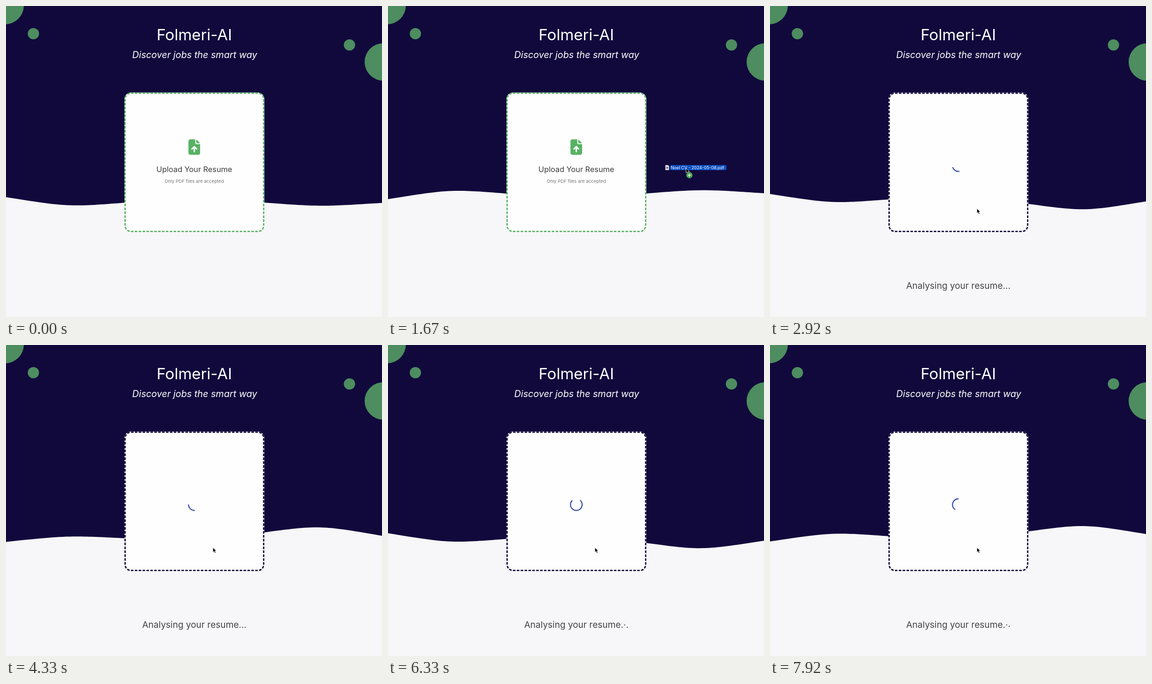
An HTML page for the animation above (8000 ms loop, 800x663 px).

```html
<!DOCTYPE html>
<html lang="en">
<head>
<meta charset="utf-8">
<title>Resume upload</title>
<style>
  html, body { margin: 0; width: 100%; height: 100%; overflow: hidden; background: #11093c; }
  svg { display: block; width: 100%; height: 100%; }
  text { font-family: Inter, "Open Sans", sans-serif; font-optical-sizing: none; }
  .mid { text-anchor: middle; }
  #title { font-size: 33px; fill: #fff; }
  #tagline { font-size: 19.8px; font-style: italic; fill: #fff; }
  #prompt { font-size: 16.3px; fill: #3d3d3d; }
  #hint { font-size: 9.6px; fill: #777; }
  #status { font-size: 19px; fill: #444; }
  #label { font-size: 9px; fill: #fff; }
  #border { fill: none; stroke-width: 2.8; stroke-dasharray: 2 1; }
  .bubbles { fill: #4d8d5f; }
  .loading { display: none; }
</style>
</head>
<body>
<svg viewBox="0 0 800 663" preserveAspectRatio="none">
  <defs>
    <path id="arrow" d="M0 0V10.2L2.4 8 4 11.8 6 11 4.4 7.3H7.4Z" fill="#000" stroke="#fff" stroke-width=".8"/>
  </defs>

  <rect width="800" height="663" fill="#11093c"/>
  <g class="bubbles">
    <circle cx="-2" cy="-1" r="40"/>
    <circle cx="58.3" cy="59" r="12"/>
    <circle cx="730.8" cy="83" r="12"/>
    <circle cx="803" cy="119.3" r="40"/>
  </g>
  <path id="wave" fill="#f7f6f8"/>

  <text id="title" class="mid" x="400.7" y="73">Folmeri-AI</text>
  <text id="tagline" class="mid" x="401.5" y="111.3">Discover jobs the smart way</text>

  <rect x="252" y="184.5" width="297.6" height="297.6" rx="14" fill="#fefefe"/>
  <rect id="border" x="253.4" y="185.9" width="294.8" height="294.8" rx="12.5" pathLength="420"/>

  <g class="idle">
    <g transform="translate(388.2 284.3) scale(.0645)" fill="#58b264">
      <path d="M224 0H64A64 64 0 0 0 0 64V448A64 64 0 0 0 64 512H320A64 64 0 0 0 384 448V160H256A32 32 0 0 1 224 128ZM256 0V128H384Z"/>
      <path d="M192 408V244M116 316L192 240L268 316" fill="none" stroke="#fff" stroke-width="46" stroke-linecap="round" stroke-linejoin="round"/>
    </g>
    <text id="prompt" class="mid" x="400.7" y="353.8">Upload Your Resume</text>
    <text id="hint" class="mid" x="400.6" y="377.3">Only PDF files are accepted</text>
  </g>

  <g class="loading">
    <g transform="translate(400.7 340.3) scale(.614)">
      <circle id="spinner" r="20.2" fill="none" stroke="#2d45a9" stroke-width="3.6"/>
    </g>
    <text id="status" class="mid" x="400.7" y="602.7">Analysing your resume<tspan>.</tspan><tspan>.</tspan><tspan>.</tspan></text>
    <use href="#arrow" x="440.2" y="431.8"/>
  </g>

  <g class="idle">
    <g id="drag">
      <path d="M-44-6.2H-38.5L-36-3.7V4.2H-44Z" fill="#e9e8ee"/>
      <rect x="-42.3" y="-2.6" width="4.6" height="4" fill="#77718f"/>
      <rect x="-34" y="-6.6" width="120" height="11.2" rx="4" fill="#0c4dc0"/>
      <text id="label" class="mid" x="24.5" y="2.2">Noel CV - 2024-05-08.pdf</text>
      <use href="#arrow"/>
      <circle cx="7.2" cy="15.2" r="6.2" fill="#45a84a" stroke="#8fcb92" stroke-width=".6"/>
      <path d="M3.7 15.2H10.7M7.2 11.7V18.7" stroke="#fff" stroke-width="1.3"/>
    </g>
  </g>
</svg>

<script>
const LOOP = 8000, FPS = 12, DROP = 2655;
const $ = id => document.getElementById(id);
const idle = document.querySelectorAll('.idle');
const loading = document.querySelectorAll('.loading');
const dots = document.querySelectorAll('#status tspan');

const dashes = $('spinner').animate([
  { strokeDasharray: '1px, 200px', strokeDashoffset: '0px', easing: 'ease-in-out' },
  { strokeDasharray: '100px, 200px', strokeDashoffset: '-15px', easing: 'ease-in-out' },
  { strokeDasharray: '100px, 200px', strokeDashoffset: '-125px' }
], { duration: 1400, iterations: Infinity });

const at = (ms, x, y, easing = 'linear') =>
  ({ offset: ms / LOOP, transform: `translate(${x}px, ${y}px)`, easing });
const dragging = $('drag').animate([
  at(0, 860, 290),
  at(900, 860, 290),
  at(1667, 634, 345.5, 'ease-out'),
  at(2580, 440, 432),
  at(LOOP, 440, 432)
], { duration: LOOP, fill: 'both' });

[dashes, dragging].forEach(a => a.pause());

// Three-segment wave: each anchor bobs with its own phase, control points mirror each other.
function wavePath(t) {
  const y = lag => {
    const deg = 78.6 + 0.107 * t + 34.38 * lag;
    return 409.5 - 10.2 * Math.cos(deg * Math.PI / 180);
  };
  const points = [0, 2, 4, 3].map((lag, i) => [i * 800 / 3, y(lag)]);
  let ctrl = [400 / 3, 2 * points[1][1] - points[0][1]];
  let d = `M${points[0]}`;
  for (let i = 1; i < points.length; i++) {
    d += `C${ctrl} ${ctrl} ${points[i]}`;
    ctrl = ctrl.map((c, k) => 2 * points[i][k] - c);
  }
  return d + 'V663H0Z';
}

function bounceDots(t) {
  const phase = (t - DROP) % 1500;
  let previous = 0;
  dots.forEach((dot, i) => {
    const away = (phase - [480, 715, 910][i]) / 200;
    const lift = Math.abs(away) < 1 ? 4.8 * Math.cos(away * Math.PI / 2) : 0;
    dot.setAttribute('dy', previous - lift);
    previous = lift;
  });
}

function draw(t) {
  const busy = t >= DROP;
  idle.forEach(el => el.style.display = busy ? 'none' : 'inline');
  loading.forEach(el => el.style.display = busy ? 'inline' : 'none');
  $('border').setAttribute('stroke', busy ? '#11093c' : '#58b264');
  $('wave').setAttribute('d', wavePath(t));
  dragging.currentTime = t;
  if (busy) {
    const spin = t + 145;
    dashes.currentTime = spin;
    $('spinner').setAttribute('transform', `rotate(${spin % 1400 / 1400 * 360})`);
    bounceDots(t);
  }
}

const start = performance.now();
function tick(now) {
  const t = Math.max(0, now - start) % LOOP;
  const step = Math.floor(t * FPS / 1000 + 0.045) % (LOOP * FPS / 1000);
  draw(step * 1000 / FPS);
  requestAnimationFrame(tick);
}
draw(0);
requestAnimationFrame(tick);
</script>
</body>
</html>
```
